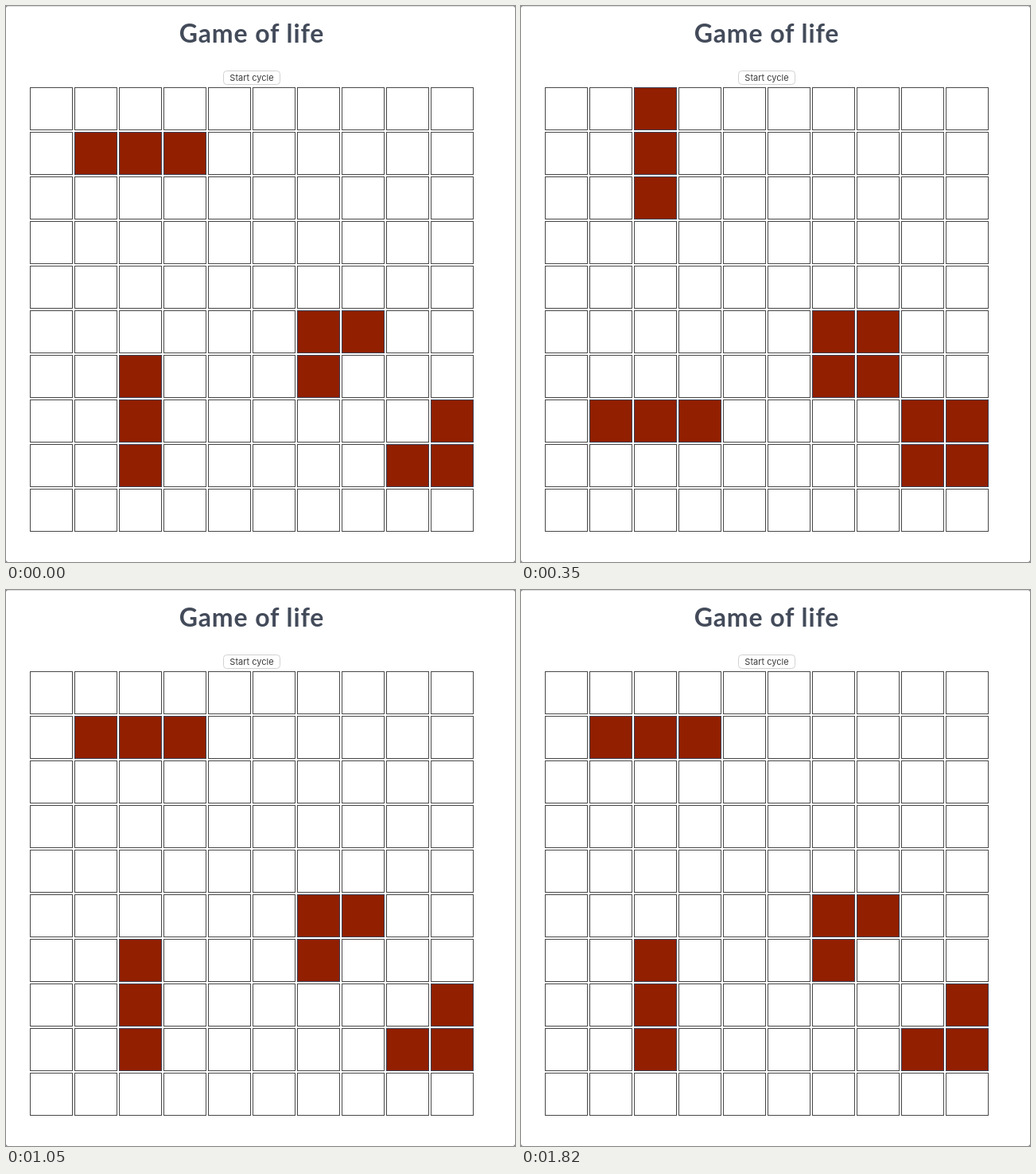
Write an HTML page that moves like this. It is 640 px wide and 698 px high and loops after 2030 ms.

```html
<!DOCTYPE html>
<html lang="en">
<head>
<meta charset="utf-8">
<title>Game of life</title>
<style>
  html, body { margin: 0; width: 100%; height: 100%; overflow: hidden; background: #fff; }
  svg { display: block; width: 640px; height: 698px; }
  .title { font: 700 32px Lato, sans-serif; letter-spacing: 0.9px; fill: #434b5a; }
  .label { font: 400 11px Inter, sans-serif; fill: #3a3a3a; }
  .button { fill: #fff; stroke: #d2d2d2; }
  .cell { fill: #fff; stroke: #484848; }
  .cell.alive { fill: #911f00; stroke: #3d4254; }
</style>
</head>
<body>
<svg viewBox="0 0 640 698">
  <path d="M0 .5H640" stroke="#dcdcdc"/>
  <path d="M0 0h2L0 2zM640 0h-2l2 2zM0 698h2l-2-2zM640 698h-2l2-2z" fill="#8a8a8a"/>
  <text class="title" x="309" y="46" text-anchor="middle">Game of life</text>
  <rect class="button" x="273.5" y="81.5" width="71" height="17" rx="4"/>
  <text class="label" x="309" y="94" text-anchor="middle">Start cycle</text>
  <g id="board"></g>
</svg>
<script>
const SIZE = 10, PITCH = 56, LEFT = 30, TOP = 102, LOOP = 2030;

// Live cells as column-row digit pairs.
const seed = '11 21 31 65 75 66 26 27 28 97 88 98'.split(' ');
const next = '20 21 22 65 75 66 76 17 27 37 87 97 88 98'.split(' ');
const steps = [[0, seed], [210, next], [770, seed], [1260, next], [1820, seed]];

const board = document.getElementById('board');
const cells = new Map();
for (let row = 0; row < SIZE; row++) {
  for (let col = 0; col < SIZE; col++) {
    const cell = document.createElementNS(board.namespaceURI, 'rect');
    const attrs = {
      class: 'cell', width: 53, height: 53,
      x: LEFT + col * PITCH + 0.5, y: TOP + row * PITCH + 0.5
    };
    for (const name in attrs) cell.setAttribute(name, attrs[name]);
    board.append(cell);
    cells.set(`${col}${row}`, cell);
  }
}

let shown;
function show(generation) {
  if (generation === shown) return;
  shown = generation;
  cells.forEach((cell, key) => cell.classList.toggle('alive', generation.includes(key)));
}

const start = performance.now();
function tick() {
  const time = (performance.now() - start) % LOOP;
  show(steps.filter(([at]) => at <= time).pop()[1]);
  requestAnimationFrame(tick);
}
tick();
</script>
</body>
</html>
```
